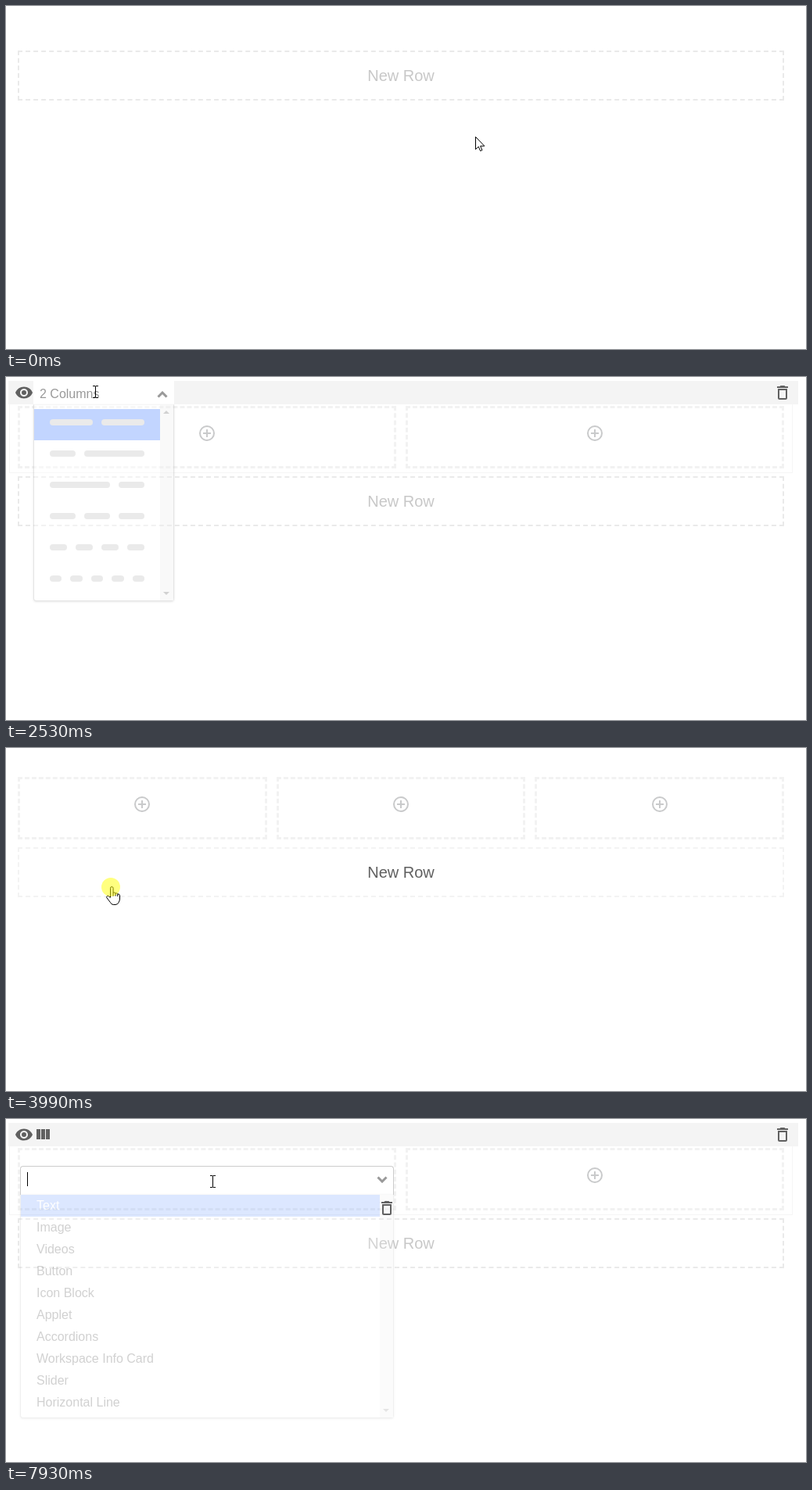
Recreate the animation shown at these times as an HTML page. Size 1023 by 439 pixels, loop 8 s.

```html
<!DOCTYPE html>
<html lang="en">
<head>
<meta charset="utf-8">
<title>Row builder</title>
<style>
* { box-sizing: border-box; }
html, body { margin: 0; width: 100%; height: 100%; overflow: hidden; background: #fff; }
body { position: relative; font: 16px "Liberation Sans", Arial, sans-serif; color: #333; }
svg { display: block; }
[hidden] { display: none !important; }
.abs, .icon, .opt, .bar, .scroll { position: absolute; }
.icon { width: 24px; height: 24px; fill: #606060; }
#tools { left: 3px; top: 5px; width: 1010px; height: 30px; background: #f4f4f4; }
#frame { left: 4px; top: 34px; width: 1002px; height: 89px; border: 1px solid #f5f5f5; }
#cols { left: 15px; top: 37px; width: 980px; height: 80px; display: flex; gap: 12px; }
.col { position: relative; flex: 1; border: 3px dashed #f2f2f2; }
.plus { left: calc(50% - 12px); top: 20px; fill: #c9cacb; }
.plus.on { fill: #666; }
.trash { right: -3px; top: 62px; z-index: 3; }
#newRow { left: 15px; width: 980px; height: 64px; border: 2px dashed #eaeaea; color: #c8c8c8;
  font-size: 20px; display: flex; align-items: center; justify-content: center; }
#newRow.on { border-color: #f3f3f3; color: #606060; }
.select { z-index: 2; background: #fff; }
.chev { position: absolute; fill: none; stroke: #999; stroke-width: 3; }
.chev.down { transform: scaleY(-1); }
.menu { z-index: 2; background: #fff; border: 1px solid #bbb; border-top-color: #e6e6e6;
  border-radius: 0 0 4px 4px; box-shadow: 0 1px 3px rgba(0,0,0,.25); }
.opt { left: 0; right: 17px; }
.opt.on { background: #6394ff; color: #fff; }
.bar { top: 13px; height: 8px; border-radius: 4px; background: #c9c9c9; }
.scroll { right: 0; top: 0; bottom: 0; width: 17px; background: #f1f1f1; }
.scroll::before, .scroll::after { content: ""; position: absolute; left: 4px; border: 4px solid transparent; }
.scroll::before { top: 7px; border-top: 0; border-bottom-color: #8a8a8a; }
.scroll::after { bottom: 7px; border-bottom: 0; border-top-color: #8a8a8a; }
#pointer { left: 0; top: 0; z-index: 5; }
#pointer svg { position: absolute; overflow: visible; fill: #fff; stroke: #000; stroke-width: 1; }
#click { left: -12px; top: -12px; width: 24px; height: 24px; border-radius: 50%; background: rgba(255,255,0,.5); }
</style>
</head>
<body>
<div id="frame" class="abs"></div>
<div id="tools" class="abs"></div>
<div id="cols" class="abs"></div>
<div id="newRow" class="abs">New Row</div>

<div id="layoutSelect" class="abs select" style="left:35px;top:5px;width:180px;height:31px">
  <span id="layoutValue" class="abs" style="left:8px;top:8px;white-space:nowrap">2 Columns</span>
</div>
<div id="layoutMenu" class="abs menu" style="left:35px;top:35px;width:180px;height:252px"></div>

<div id="blockSelect" class="abs select" style="left:18px;top:60px;width:478px;height:37px;border:1px solid #ccc;border-bottom:0;border-radius:4px 4px 0 0">
  <i id="caret" class="abs" style="left:8px;top:7px;width:1px;height:18px;background:#000"></i>
</div>
<div id="blockMenu" class="abs menu" style="left:18px;top:96px;width:478px;height:287px"></div>

<div id="pointer" class="abs">
  <svg id="arrow" width="13" height="20"><path d="M.5.5V16.5L4.2 13 6.6 18.5 8.9 17.5 6.6 12.2H11.8Z"/></svg>
  <svg id="hand" width="19" height="25" style="left:-6px;top:-1px">
    <path d="M5.5 14V2.4a1.8 1.8 0 0 1 3.6 0V8.2q1.6-1 3 .8 1.7-.9 2.7.9 2.4-.5 2.7 1.9V16q0 2-1.2 4.2-1.3 3.3-4.3 3.3H9.2q-2.4 0-3.7-2.8L1 14.9Q0 13 1.6 12.3q1.6-.5 3.9 2.4M9.1 8V12.5M12.1 9V12.5M14.8 10V13"/>
  </svg>
  <svg id="beam" width="8" height="16" style="left:-3px;top:-8px">
    <path fill="none" d="M0 .5H3L3.5 1 4 .5H7M3.5 1V15M0 15.5H3L3.5 15 4 15.5H7"/>
  </svg>
  <div id="click" class="abs"></div>
</div>

<script>
const $ = id => document.getElementById(id);
const show = (el, on) => { el.hidden = !on; if (el.ownerSVGElement !== undefined) el.style.display = on ? '' : 'none'; };
const add = (parent, html) => { parent.insertAdjacentHTML('beforeend', html); return parent.lastElementChild; };

const shapes = {
  eye: 'M12 4.5C7 4.5 2.73 7.61 1 12c1.73 4.39 6 7.5 11 7.5s9.27-3.11 11-7.5c-1.73-4.39-6-7.5-11-7.5zM12 17c-2.76 0-5-2.24-5-5s2.24-5 5-5 5 2.24 5 5-2.24 5-5 5zm0-8a3 3 0 1 0 0 6 3 3 0 0 0 0-6z',
  columns: 'M4 5h5v13H4zM10 5h5v13h-5zM16 5h5v13h-5z',
  trash: 'M6 19c0 1.1.9 2 2 2h8c1.1 0 2-.9 2-2V7H6v12zM8 9h8v10H8V9zm7.5-5l-1-1h-5l-1 1H5v2h14V4z',
  plus: 'M13 7h-2v4H7v2h4v4h2v-4h4v-2h-4zM12 2a10 10 0 1 0 0 20 10 10 0 0 0 0-20zm0 18a8 8 0 1 1 0-16 8 8 0 0 1 0 16z'
};
const icon = (parent, name, style = '') =>
  add(parent, `<svg class="icon ${name}" viewBox="0 0 24 24" style="${style}"><path fill-rule="evenodd" d="${shapes[name]}"/></svg>`);
const chevron = (parent, x, y) =>
  add(parent, `<svg class="chev down" width="14" height="9" style="left:${x}px;top:${y}px"><path d="M1.5 7.5 7 2l5.5 5.5"/></svg>`);

icon($('tools'), 'eye', 'left:8px;top:3px');
const columnsIcon = icon($('tools'), 'columns', 'left:32px;top:3px');
icon($('tools'), 'trash', 'left:978px;top:3px');

const cols = [0, 1, 2].map(() => {
  const el = add($('cols'), '<div class="col"></div>');
  return { el, plus: icon(el, 'plus'), trash: icon(el, 'trash') };
});

const layoutChevron = chevron($('layoutSelect'), 158, 13);
chevron($('blockSelect'), 455, 12);

// Bar widths of each column layout, 11 px apart
const layouts = [[55, 55], [33, 77], [77, 33], [33, 33, 33], [22, 22, 22, 22], Array(5).fill(15.4)];
const layoutOpts = layouts.map((widths, i) => {
  const opt = add($('layoutMenu'), `<div class="opt" style="top:${5 + 40 * i}px;height:40px"></div>`);
  let x = 20;
  for (const w of widths) {
    add(opt, `<i class="bar" style="left:${x}px;width:${w}px"></i>`);
    x += w + 11;
  }
  return opt;
});
['Text', 'Image', 'Videos', 'Button', 'Icon Block', 'Applet', 'Accordions',
  'Workspace Info Card', 'Slider', 'Horizontal Line'].forEach((name, i) =>
  add($('blockMenu'), `<div class="opt${i ? '' : ' on'}" style="top:${28 * i}px;height:28px;line-height:28px;padding-left:20px">${name}</div>`));
for (const id of ['layoutMenu', 'blockMenu']) add($(id), '<div class="scroll"></div>');

// Pointer stops: time, x, y
const path = [
  [0, 600, 167], [540, 582, 90], [940, 582, 90], [1610, 49, 25], [1690, 46, 22],
  [2090, 46, 22], [2400, 114, 19], [2940, 114, 19], [3230, 118, 66], [3750, 134, 178],
  [4180, 134, 178], [4990, 703, 82], [5538, 953, 100], [5690, 980, 108], [5780, 980, 108],
  [5840, 984, 112], [6400, 984, 112], [6846, 618, 81], [7230, 258, 71], [7300, 258, 71],
  [7380, 260, 73], [7600, 260, 73], [7830, 264, 80], [8100, 264, 80]
];
const clicks = [[530, 680], [1830, 1910], [2370, 2450], [3980, 4060], [5830, 5980], [7300, 7610]];

const slope = (i, k) => path[i] && path[i + 1] ? (path[i + 1][k] - path[i][k]) / (path[i + 1][0] - path[i][0]) : 0;
const tangent = (i, k) => {
  const a = slope(i - 1, k), b = slope(i, k);
  return a * b > 0 ? 2 * a * b / (a + b) : 0;
};
// Monotone cubic through the stops
function along(t, k) {
  const i = path.findIndex((p, n) => t < path[n + 1][0]);
  const [p, q] = [path[i], path[i + 1]], d = q[0] - p[0], u = (t - p[0]) / d, v = 1 - u;
  return p[k] * v * v * (1 + 2 * u) + q[k] * u * u * (3 - 2 * u)
    + d * u * v * (v * tangent(i, k) - u * tangent(i + 1, k));
}
const within = (t, [a, b]) => t >= a && t < b;
const fade = (t, start, length) => Math.min(1, Math.max(0, (t - start) / length));

function draw(t) {
  const x = Math.round(along(t, 1)), y = Math.round(along(t, 2));
  const added = t >= 610, count = within(t, [3980, 5910]) ? 3 : 2;
  const layoutOn = within(t, [1910, 3980]), blockOn = t >= 7530;
  const rowTop = added ? 127 : 57;
  const overNew = !layoutOn && y >= rowTop && y < rowTop + 64;
  const overRow = added && (layoutOn || y < 125);
  const pitch = 992 / count, active = overRow && !layoutOn && y > 36 ? Math.floor((x - 15) / pitch) : -1;

  show($('tools'), overRow);
  show($('frame'), overRow);
  show($('cols'), added);
  columnsIcon.style.fill = blockOn ? '' : '#5c665c';
  $('newRow').style.top = rowTop + 'px';
  $('newRow').classList.toggle('on', overNew);

  let overPlus = false;
  cols.forEach((c, i) => {
    const center = 15 + pitch * i + (pitch - 12) / 2;
    const hit = i === active && Math.hypot(x - center, y - 72) < 12;
    overPlus = overPlus || hit;
    show(c.el, i < count);
    show(c.trash, i === active);
    show(c.plus, !(blockOn && i === 0));
    c.plus.classList.toggle('on', hit);
  });

  const opened = t >= 2450;
  show($('layoutSelect'), layoutOn);
  show($('layoutMenu'), layoutOn && opened);
  $('layoutMenu').style.opacity = fade(t, 2450, 230);
  $('layoutValue').style.color = opened ? '#999' : '#333';
  layoutChevron.classList.toggle('down', !opened);
  const picked = Math.max(0, Math.floor((y - 41) / 40));
  layoutOpts.forEach((o, i) => o.classList.toggle('on', i === picked));

  show($('blockSelect'), blockOn);
  show($('caret'), t >= 7760);
  $('blockMenu').style.opacity = fade(t, 7850, 330);

  const beam = layoutOn && y < 36 || blockOn;
  const overTrash = active >= 0 && y > 103 && x > 15 + pitch * (active + 1) - 34;
  const hand = !beam && (overNew || layoutOn || overPlus || overTrash || overRow && y < 35 && x < 60);
  show($('beam'), beam);
  show($('hand'), hand);
  show($('arrow'), !beam && !hand);
  show($('click'), clicks.some(c => within(t, c)));
  $('pointer').style.transform = `translate(${x}px,${y}px)`;
}

// The screen refreshes 13 times a second
function tick() {
  const t = performance.now() % 8000;
  draw(Math.floor((t + 10) * .013) / .013);
  requestAnimationFrame(tick);
}
tick();
</script>
</body>
</html>
```
